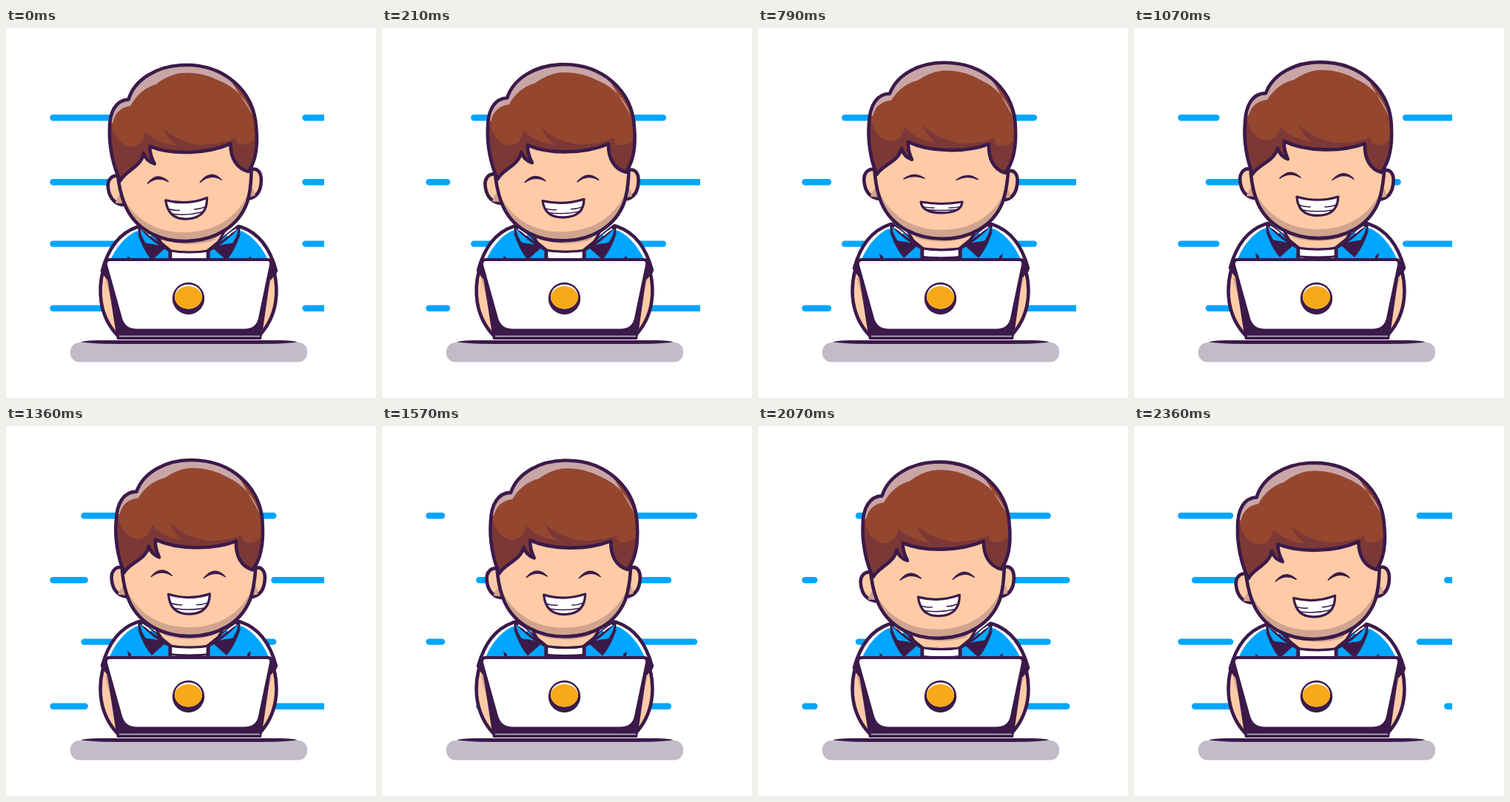
These frames come from a looping animation (500 by 500 pixels, 2.43 s). An HTML page:

```html
<!DOCTYPE html>
<html lang="en">
<head>
<meta charset="utf-8">
<title>Laughing at the laptop</title>
<style>
  html, body { margin: 0; width: 100%; height: 100%; overflow: hidden; background: #fff; }
  svg { display: block; width: 100%; height: 100%; }
  .ink { stroke: #3b1a4a; stroke-width: 4.6; stroke-linejoin: round; stroke-linecap: round; }
  .thin { stroke-width: 3.2; }
  .fine { stroke-width: 1.5; }
  .dark { fill: #3b1a4a; }
  .blue { fill: #00a6ff; }
  .skin { fill: #ffcba6; }
  .shade { fill: #d0a48f; }
  .white { fill: #fff; }
  .none { fill: none; }
  .face path { vector-effect: non-scaling-stroke; }
  #rows path { fill: none; stroke: #00a6ff; stroke-width: 8.4; stroke-linecap: round; stroke-dasharray: 85.25; }
</style>
</head>
<body>
<svg viewBox="0 0 500 500">
  <defs>
    <clipPath id="band"><path d="M0 0H430V500H0Z"/></clipPath>
    <path id="jaw" d="M158 150C156 185 157 212 167 236C181 268 214 284 249 284C286 284 317 267 330 236C338 214 340 185 338 150Z"/>
    <path id="hair" d="M160.500 197C152 178 148 150 150 128C151 103 161 88 178 88C188 61 219 46 251 46C309 46 348 86 348 136C349 160 345 181 334 195C318 190 311 175 312 156C280 168 232 167 203 153Q202 164 208 177Q197 173 194 162C190 180 168 184 160.500 197Z"/>
    <clipPath id="inJaw"><use href="#jaw"/></clipPath>
    <clipPath id="inHair"><use href="#hair"/></clipPath>
    <g id="arm">
      <path class="ink skin" d="M131 328C125 352 124 388 152 417L165 410L145 322Z"/>
      <path class="shade" d="M134 338L138 334L154 408Q143 374 134 338Z"/>
    </g>
    <g id="shoulder">
      <path class="ink white" d="M177 265C154 273 138 294 130 324L138 334H222V297L181 264Z"/>
      <path class="blue" d="M175 271C160 279 148 293 140 312L143 330H220V298L181 270Z"/>
      <path class="dark" d="M164 304L169 308V315H166ZM130 318L140 313L139 334L129 328Z"/>
      <path class="dark" d="M177 272L186 285Q202 289 217 292L197 310Q189 301 183 287Z"/>
      <path class="blue" d="M181 267Q198 273 206 286Q194 290 186 285Z"/>
      <path class="ink none thin" d="M186 285Q179 275 180 264Q199 285 221 297V316"/>
      <path class="none" stroke="#fff" stroke-width="2" d="M184 268Q191 272 196 277"/>
    </g>
  </defs>

  <rect width="500" height="500" fill="#fff"/>
  <g id="rows" clip-path="url(#band)">
    <path d="M63.5 121.300H700"/>
    <path d="M63.5 208.300H700"/>
    <path d="M63.5 291.600H700"/>
    <path d="M63.5 378.700H700"/>
  </g>

  <use href="#arm"/>
  <use href="#arm" transform="matrix(-1 0 0 1 493 0)"/>

  <g id="body">
    <path class="white" d="M205 296H290V332H205Z"/>
    <path class="dark" d="M215 306.5Q248 310.5 280 306.5V309.5Q248 313.5 215 309.5Z"/>
    <path class="ink skin thin" d="M200 270H296L280 296Q248 302 216 296Z"/>
    <path class="shade" d="M204 272H292L281 283Q248 293 215 283Z"/>
    <use href="#shoulder"/>
    <use href="#shoulder" transform="matrix(-1 0 0 1 495 0)"/>
  </g>

  <g id="head">
    <path class="ink skin" d="M162 192C150 186 142 195 143.500 207C144.500 220 152 230 166 230Z"/>
    <path class="shade" d="M152 227Q155 216 163 213V228Z"/>
    <path class="ink skin" d="M335 194C346 188 351.500 197 350.500 208C349.500 222 344 231 330 232Z"/>
    <path class="shade" d="M341 228Q341 218 335 214L331 230Z"/>
    <use href="#jaw" class="skin"/>
    <path class="shade" clip-path="url(#inJaw)" d="M157 205C172 250 205 272 249 272C292 272 324 250 339 208V290H157Z"/>
    <use href="#jaw" class="ink none"/>
    <g clip-path="url(#inHair)">
      <path fill="#7b3836" d="M140 40H355V205H140Z"/>
      <path fill="#95462f" d="M140 40H355V143Q341 160 325 158Q318 155 321 148Q300 156 272 155Q240 149 223 130Q227 145 240 154Q213 150 198 133Q195 150 181 152C165 153 154 137 151 112Z"/>
      <path fill="#c9a6a6" d="M140 120V40H300L345 120Q332 84 302 70Q276 55 248 57Q232 59 216 70Q194 75 180 97Q160 99 155 118Z"/>
    </g>
    <use href="#hair" class="ink none"/>
    <g id="eyes" class="face ink dark fine">
      <path d="M197 203Q211 187 225 202Q211 193 197 203Z"/>
      <path d="M268 205.500Q283 188 297 204Q283 194 268 205.500Z"/>
    </g>
    <g id="mouth" class="face ink">
      <path class="white thin" d="M220 227Q248 236 276 227Q275 254 248 254Q222 254 220 227Z"/>
      <path class="none fine" d="M223 239Q231 242 238 241.500M273 239Q265 242 258 241.500M228 246Q248 250 268 246"/>
    </g>
  </g>

  <path class="dark" d="M140 311H354Q361 311 360 318L345 421H150L134 318Q133 311 140 311Z"/>
  <path class="white" d="M141 315H353Q357 315 356 320L341 392Q338 406.500 322 406.500H177Q161 406.500 157 392L137 320Q136 315 141 315Z"/>
  <path fill="none" stroke="#c3bbc8" stroke-width="1.5" d="M153 416.5H343"/>
  <circle class="dark" cx="246.5" cy="365.5" r="21.7"/>
  <ellipse cx="246.5" cy="363" rx="18.5" ry="16.5" fill="#fff"/>
  <ellipse cx="246.5" cy="364.2" rx="18.5" ry="15.3" fill="#f7a919"/>

  <rect x="87" y="425" width="320" height="26.5" rx="12" fill="#c3bbc8"/>
  <path class="dark" d="M101 424.5Q106 422 125 422H370Q389 422 394 424.5Q376 427 335 427H160Q120 427 101 424.5Z"/>
</svg>
<script>
  const LOOP = 2430, FPS = 14, PERIOD = 170.5;
  const get = id => document.getElementById(id);
  const rows = [...document.querySelectorAll('#rows path')];
  const ease = (t, from, to) => {
    const u = Math.min(1, Math.max(0, (t - from) / (to - from)));
    return u * u * (3 - 2 * u);
  };
  const squash = (id, y, k) =>
    get(id).setAttribute('transform', `translate(0 ${y * (1 - k)}) scale(1 ${k})`);

  function draw(now) {
    // motion is stepped at 14 pictures per second
    const step = Math.floor((now % LOOP + 4.5) * FPS / 1000) % 34;
    const t = step * 1000 / FPS;

    // dashes run four periods per loop, alternate rows in opposite directions
    const run = Math.ceil(step * 60 / FPS - 1e-6) / 146 * 4 * PERIOD % PERIOD;
    rows.forEach((row, i) => row.style.strokeDashoffset = i % 2 ? run : PERIOD - run);

    const lift = Math.sin(Math.PI * t / LOOP) ** 1.4;
    const drop = 4 * (1 - lift);
    const lean = ease(t, 0, 600) - ease(t, 1050, LOOP);
    get('body').setAttribute('transform', `translate(0 ${drop})`);
    get('head').setAttribute('transform', `translate(0 ${drop}) rotate(${-3.4 * (1 - lean)} 247 300)`);

    const calm = ease(t, 100, 420) - ease(t, 800, 1150);
    squash('mouth', 243, 1 - 0.45 * calm);
    squash('eyes', 203, 1 - 0.35 * calm);
  }

  function tick(now) {
    draw(now);
    requestAnimationFrame(tick);
  }
  draw(0);
  requestAnimationFrame(tick);
</script>
</body>
</html>
```
